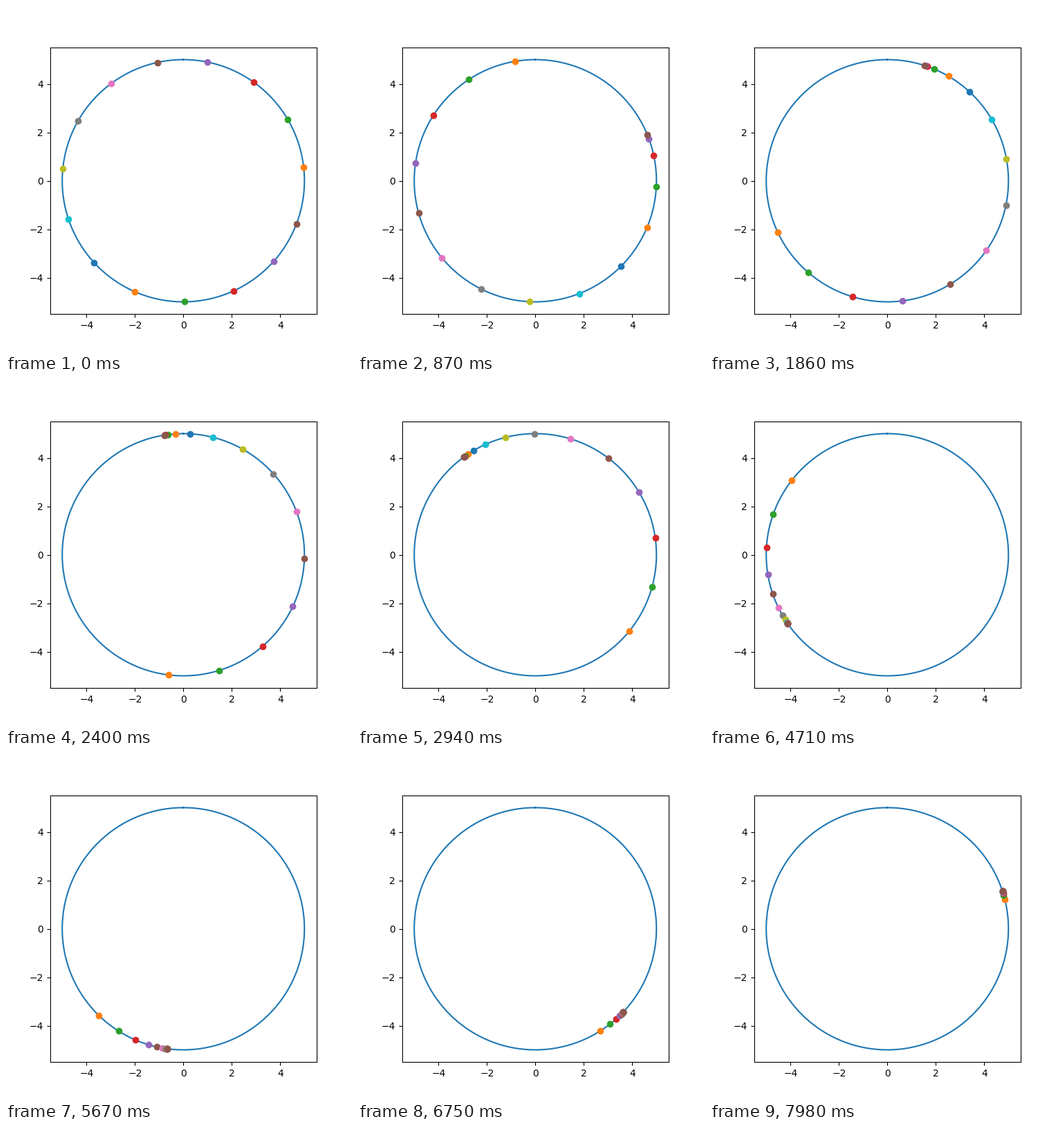
A matplotlib script that plays this animation: 500 px wide and 500 px high, repeating every 8000 ms.

```python
import numpy as np
import matplotlib.pyplot as plt
from matplotlib.animation import FuncAnimation

FRAMES = 267
INTERVAL = 30
COUNT = 15
RADIUS = 5
DRIFT = np.radians(1.5)
PULL = np.radians(4.2)
WARM_UP = 2  # steps already taken when the loop starts


def simulate(steps):
    """Angles per step: each dot drifts and is pulled towards the next one."""
    angles = np.arange(COUNT) * 2 * np.pi / COUNT
    history = []
    for _ in range(steps):
        history.append(angles)
        # the last dot leads freely
        gaps = np.append(np.diff(angles), 0)
        angles = angles + DRIFT + PULL * np.sin(gaps)
    return np.array(history)


track = simulate(FRAMES + WARM_UP)[WARM_UP:]

fig, ax = plt.subplots(figsize=(5, 5), dpi=100)
ax.set_aspect("equal")
ax.set_xlim(-5.5, 5.5)
ax.set_ylim(-5.5, 5.5)
ax.set_xticks(range(-4, 5, 2))
ax.set_yticks(range(-4, 5, 2))

t = np.linspace(0, 2 * np.pi, 200)
ax.plot(RADIUS * np.sin(t), RADIUS * np.cos(t), color="C0")
dots = [ax.plot([], [], "o", color=f"C{(k + 1) % 10}")[0] for k in range(COUNT)]


def update(i):
    for dot, a in zip(dots, track[i]):
        dot.set_data([RADIUS * np.cos(a)], [RADIUS * np.sin(a)])
    return dots


def init():
    return update(0)


anim = FuncAnimation(fig, update, frames=FRAMES, init_func=init,
                     interval=INTERVAL, repeat=True, repeat_delay=0)
plt.show()
```
